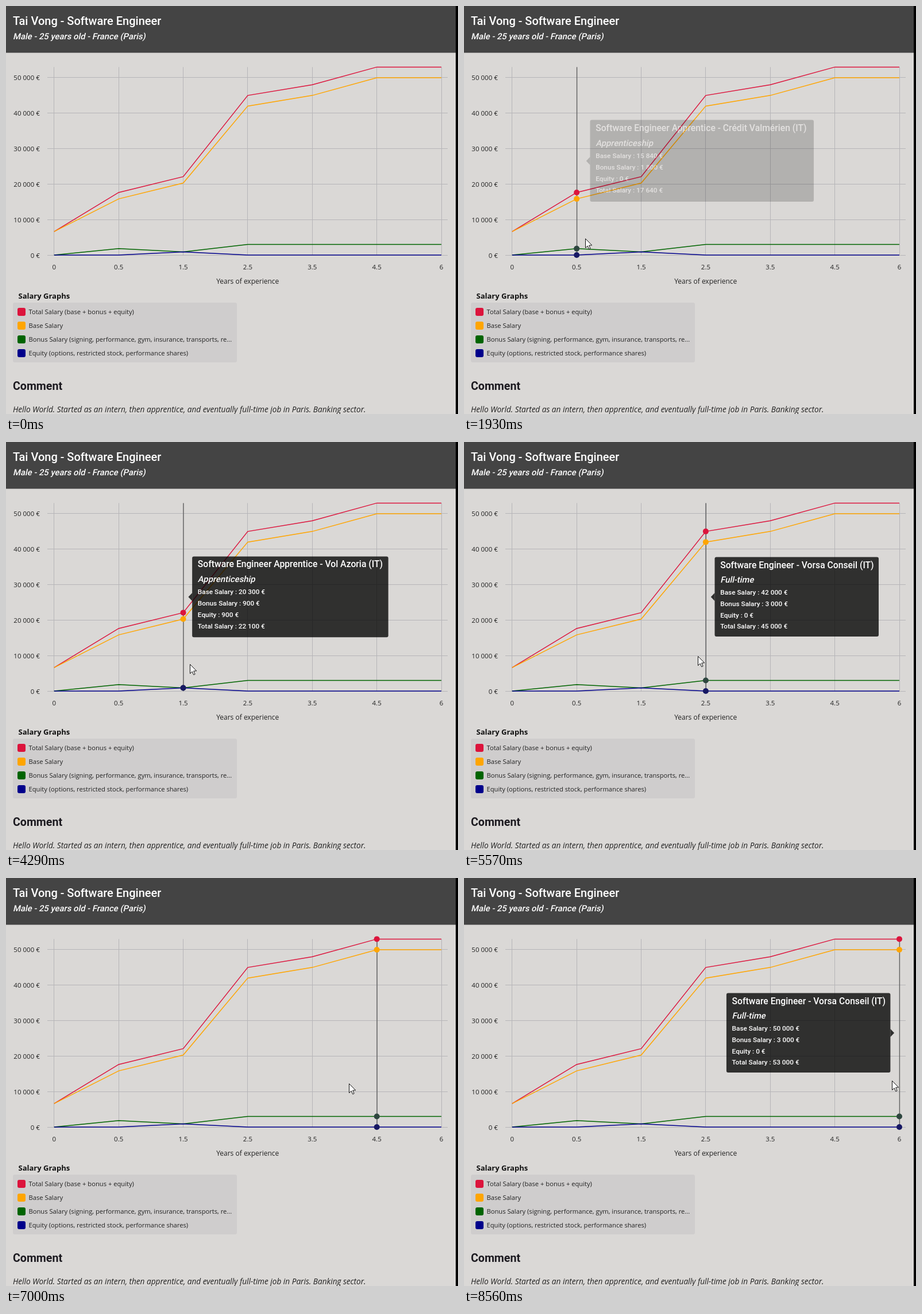
Animation of 787x711 px, one loop 9.55 s. Source, as an HTML page with a canvas:

```html
<!DOCTYPE html>
<html lang="en">
<head>
<meta charset="utf-8">
<title>Salary chart</title>
<style>
html, body { margin: 0; width: 100%; height: 100%; overflow: hidden; background: #dad8d6; }
canvas { display: block; }
</style>
</head>
<body>
<canvas id="stage" width="787" height="711"></canvas>
<script>
const stage = document.getElementById('stage');
const page = stage.getContext('2d');
const layer = stage.cloneNode().getContext('2d');
let ctx = page;

const LOOP = 9550;
const ROBOTO = 'Roboto, sans-serif';
const SANS = '"Open Sans", "Noto Sans", sans-serif';
const INK = '#222';
const TOP = 106.4, BASE = 434, LEFT = 72, RIGHT = 769;
const STEP = 112.37;
const TIP_DELAY = 100, TIP_FADE = 300, GLIDE = 150;

const years = ['0', '0.5', '1.5', '2.5', '3.5', '4.5', '6'];
const base = [6600, 15840, 20300, 42000, 45000, 50000, 50000];
const bonus = years.map((_, i) => i > 2 ? 3000 : [0, 1800, 900][i]);
const equity = years.map((_, i) => i === 2 ? 900 : 0);
const total = base.map((b, i) => b + bonus[i] + equity[i]);

const series = [
  { label: 'Total Salary (base + bonus + equity)', color: '#dc143c', dot: '#dc143c', data: total },
  { label: 'Base Salary', color: '#ffa500', dot: '#ffa500', data: base },
  { label: 'Bonus Salary (signing, performance, gym, insurance, transports, re...', color: '#006400', dot: '#2e463f', data: bonus },
  { label: 'Equity (options, restricted stock, performance shares)', color: '#00008b', dot: '#171863', data: equity }
];

const jobs = [
  { title: 'Software Engineer Intern - Groupe Irvel (IT)', type: 'Internship', width: 326 },
  { title: 'Software Engineer Apprentice - Crédit Valmérien (IT)', type: 'Apprenticeship', width: 389.5 },
  { title: 'Software Engineer Apprentice - Vol Azoria (IT)', type: 'Apprenticeship', width: 341.5 },
  { title: 'Software Engineer - Vorsa Conseil (IT)', type: 'Full-time', width: 285.5 }
];

// Pointer trips, one per data point: departure, moment the point lights up, resting place
const trips = [
  { leave: 480, hover: 675, x: 107, y: 403, nudge: 1380 },
  { leave: 1660, hover: 1780, x: 211, y: 405, nudge: 2330 },
  { leave: 2880, hover: 2955, x: 316, y: 388 },
  { leave: 4280, hover: 4425, x: 403, y: 373 },
  { leave: 5560, hover: 5765, x: 515, y: 362 },
  { leave: 6730, hover: 6985, x: 628, y: 357 },
  { leave: 7820, hover: 8145, x: 745, y: 353 }
];

const px = i => 83.8 + i * STEP;
const py = v => BASE - v * (BASE - TOP) / 53000;
const crisp = v => Math.floor(v) + 0.5;
const money = v => String(v).replace(/\B(?=(\d{3})+$)/g, ' ') + ' €';
const clamp = v => Math.min(1, Math.max(0, v));

function text(str, x, y, font, color = INK, align = 'left') {
  ctx.font = font;
  ctx.fillStyle = color;
  ctx.textAlign = align;
  ctx.fillText(str, x, y);
}

function slanted(str, x, y, font, color) {
  ctx.save();
  ctx.transform(1, 0, -0.22, 1, x, y);
  text(str, 0, 0, font, color);
  ctx.restore();
}

function line(points, color, width) {
  ctx.beginPath();
  points.forEach(([x, y]) => ctx.lineTo(x, y));
  ctx.strokeStyle = color;
  ctx.lineWidth = width;
  ctx.stroke();
}

function box(x, y, w, h, r, color) {
  ctx.beginPath();
  ctx.roundRect(x, y, w, h, r);
  ctx.fillStyle = color;
  ctx.fill();
}

const bezier = (a, b, s) => 3 * (1 - s) * (1 - s) * s * a + 3 * (1 - s) * s * s * b + s * s * s;

// CSS "ease"
function ease(p) {
  let lo = 0, hi = 1;
  for (let i = 0; i < 20; i++) {
    const mid = (lo + hi) / 2;
    if (bezier(0.25, 0.25, mid) < p) lo = mid; else hi = mid;
  }
  return bezier(0.1, 1, lo);
}

function drawPage() {
  box(0, 0, 787, 711, 0, '#dad8d6');
  box(0, 0, 783, 81.5, 0, '#444444');
  box(783, 0, 4, 711, 0, '#000');
  text('Tai Vong - Software Engineer', 12, 33, '500 20px ' + ROBOTO, '#fff');
  slanted('Male - 25 years old - France (Paris)', 12, 58, '500 14.8px ' + ROBOTO, '#fff');

  text('Salary Graphs', 21.5, 509.5, '700 13px ' + SANS, '#111');
  box(12, 517, 390, 104, 3, '#cfcdcd');
  series.forEach((s, i) => {
    const y = 533 + i * 24;
    box(20, y - 7, 14, 14, 3, s.color);
    text(s.label, 39.5, y + 4, '400 11.2px ' + SANS);
  });
  text('Comment', 12, 669, '700 19.6px ' + ROBOTO, '#1c1a20');
  text('Hello World. Started as an intern, then apprentice, and eventually full-time job in Paris. Banking sector.',
    12, 708, 'italic 400 13.65px ' + SANS);
}

function drawChart() {
  const grid = '#b6b5b8';
  for (let v = 0; v <= 50000; v += 10000) {
    const y = crisp(py(v));
    line([[LEFT, y], [RIGHT, y]], grid, 1);
    text(money(v), 59, y + 4, '400 11.5px ' + SANS, INK, 'right');
  }
  years.forEach((label, i) => {
    const x = crisp(px(i));
    line([[x, TOP], [x, BASE]], grid, 1);
    text(label, px(i), 459, '400 11.5px ' + SANS, INK, 'center');
  });
  text('Years of experience', 420.7, 483.5, '400 12px ' + SANS, INK, 'center');
  series.forEach(s => line(s.data.map((v, i) => [px(i), py(v)]), s.color, 1.5));
}

function drawHover(i) {
  const x = px(i) + 0.4;
  line([[x, TOP], [x, BASE]], '#606060', 1.4);
  series.forEach(s => box(px(i) - 5, py(s.data[i]) - 5, 10, 10, 5, s.dot));
}

function drawTip(i, shift) {
  const job = jobs[Math.min(i, 3)], w = job.width;
  const grow = (w - 285.5) / 52;
  const side = px(i) + 20 + w < RIGHT ? 1 : -1;
  const edge = px(i) + side * (15.6 + shift);
  const x = side > 0 ? edge : edge - w;
  const h = 138.5 + grow * 2;
  box(x, 269.8 - h / 2, w, h, 3, 'rgba(0,0,0,0.78)');
  ctx.beginPath();
  ctx.moveTo(edge, 263);
  ctx.lineTo(edge - side * 6.7, 270);
  ctx.lineTo(edge, 277);
  ctx.fill();

  const tx = x + 9.7;
  text(job.title, tx, 219.5 - grow, '500 15.7px ' + ROBOTO, '#fff');
  slanted(job.type, tx, 245 - grow * 0.5, '500 14.8px ' + ROBOTO, '#fff');
  const rows = [['Base Salary', base], ['Bonus Salary', bonus], ['Equity', equity], ['Total Salary', total]];
  rows.forEach(([name, data], k) => {
    const y = 266.3 + k * 19.7 - grow * (0.8 - k * 0.15);
    text(name + ' : ' + money(data[i]), tx, y, '500 11.8px ' + ROBOTO, '#fff');
  });
}

// The whole tooltip fades as one group
function fadeTip(i, p) {
  layer.clearRect(0, 0, 787, 711);
  ctx = layer;
  drawTip(i, 10 * (1 - p));
  ctx = page;
  ctx.globalAlpha = p;
  ctx.drawImage(layer.canvas, 0, 0);
  ctx.globalAlpha = 1;
}

// Steady up to the edge of the next point's zone, then slowing to rest
function pointerAt(t) {
  const n = trips.filter(s => s.leave <= t).length - 1;
  if (n < 0) return null;
  const to = trips[n];
  const from = n ? rest(trips[n - 1], t) : [6, 496];
  const gate = Math.max(LEFT, px(n) - STEP / 2);
  const part = (gate - from[0]) / (to.x - from[0]);
  const slow = 1 - (1 - clamp((t - to.hover) / GLIDE)) ** 2;
  const k = t < to.hover
    ? part * (t - to.leave) / (to.hover - to.leave)
    : part + (1 - part) * slow;
  const goal = rest(to, t);
  return from.map((v, d) => v + (goal[d] - v) * k);
}

function rest(trip, t) {
  const p = trip.nudge ? clamp((t - trip.nudge) / 30) : 0;
  return [trip.x + 2 * p, trip.y - 6 * p];
}

function drawPointer([x, y]) {
  ctx.save();
  ctx.translate(crisp(x + 0.5), crisp(y + 0.5));
  ctx.beginPath();
  [[0, 0], [0, 16], [3.7, 12.6], [6.2, 18.2], [8.6, 17.2], [6.2, 11.6], [11.2, 11.4]]
    .forEach(([a, b]) => ctx.lineTo(a, b));
  ctx.closePath();
  ctx.fillStyle = '#fff';
  ctx.fill();
  ctx.strokeStyle = '#111';
  ctx.lineWidth = 1;
  ctx.stroke();
  ctx.restore();
}

function frame() {
  const t = performance.now() % LOOP;
  const i = trips.filter(s => s.hover <= t).length - 1;
  drawPage();
  drawChart();
  if (i >= 0) {
    drawHover(i);
    const p = clamp((t - trips[i].hover - TIP_DELAY) / TIP_FADE);
    if (p > 0) fadeTip(i, ease(p));
  }
  const spot = pointerAt(t);
  if (spot) drawPointer(spot);
  requestAnimationFrame(frame);
}
frame();
</script>
</body>
</html>
```
